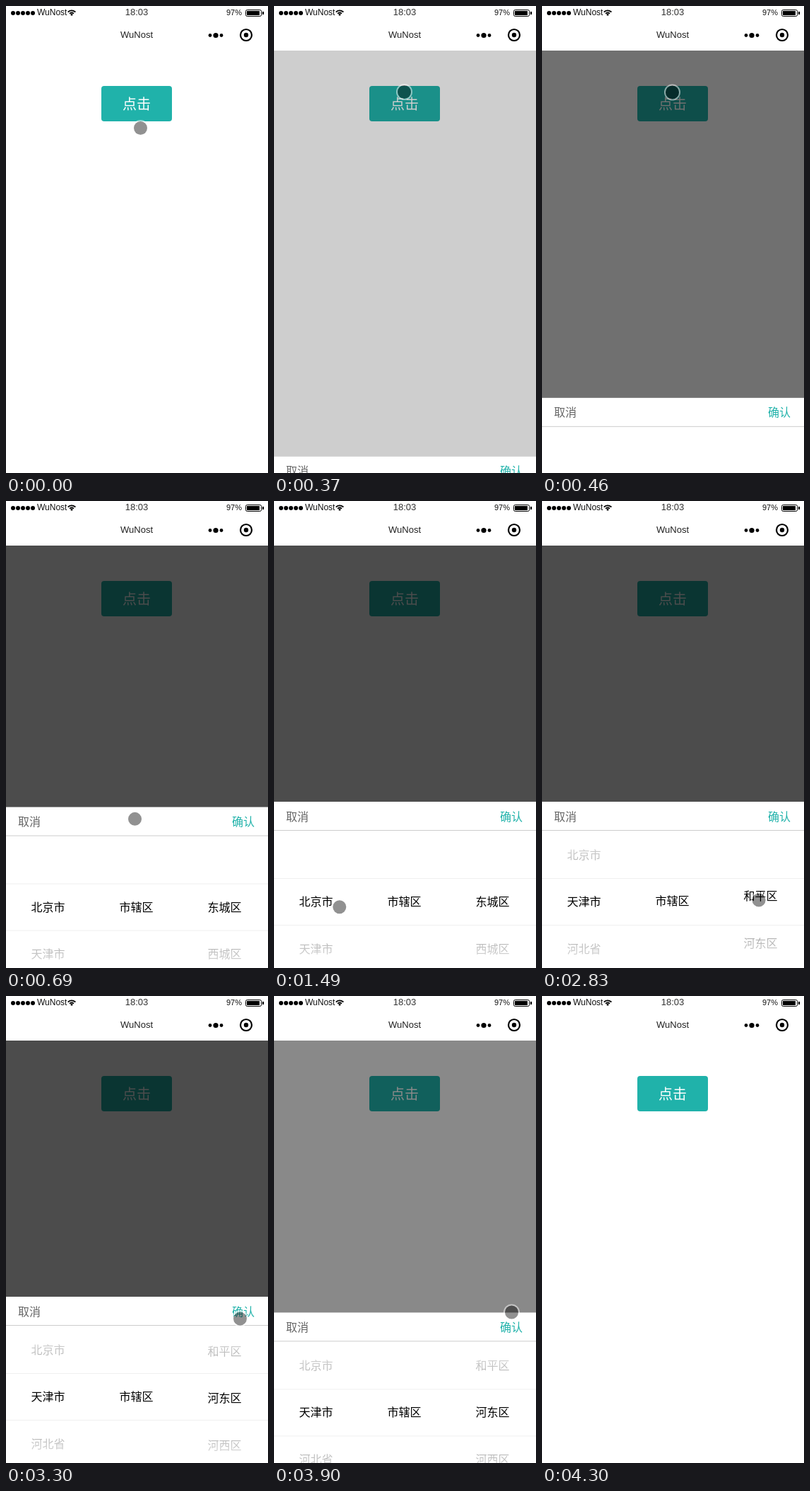
An HTML page with a canvas that plays this animation: 371 px wide and 660 px high, repeating every 4.39 s.

```html
<!DOCTYPE html>
<html lang="zh-CN">
<head>
<meta charset="utf-8">
<style>
html, body { margin: 0; width: 100%; height: 100%; overflow: hidden; background: #fff; }
canvas { display: block; }
</style>
</head>
<body>
<canvas id="stage" width="371" height="660"></canvas>
<script>
const W = 371, H = 660, NAV = 63;
const LOOP = 4390, STEPS = 56, STEP = LOOP / STEPS, LEAD = 25;
const OPEN = 344, CLOSE = 3876, CITY_SWITCH = 1880, POINTER_GONE = 4100;
const TEAL = '#20b2aa', APP = 'WuNost';
const LATIN = '"Liberation Sans", Arial, sans-serif';
const HAN = '"Noto Sans CJK SC", "Noto Sans CJK", sans-serif';
const SHEET = 235, HEADER = 41, ROW = 66.5, BAND_TOP = 108, BAND_BOTTOM = 174;
const ctx = document.getElementById('stage').getContext('2d');

const provinces = ['北京市', '天津市', '河北省', '山西省'];
const beijing = ['东城区', '西城区', '朝阳区'];
const tianjin = ['和平区', '河东区', '河西区', '南开区'];

// Places the pointer passes through: button, each wheel, confirm.
const pointerPath = [
  { t: 0, x: 190.5, y: 172.5 },
  { t: 157, x: 184.5, y: 121.5 },
  { t: 470, x: 184.5, y: 121.5 },
  { t: 706, x: 182.5, y: 450 },
  { t: 862, x: 172, y: 545 },
  { t: 1411, x: 93, y: 590 },
  { t: 1725, x: 92, y: 525 },
  { t: 1960, x: 202, y: 588 },
  { t: 2273, x: 206.5, y: 545.5 },
  { t: 2430, x: 207, y: 516 },
  { t: 2744, x: 303, y: 582 },
  { t: 3293, x: 331.5, y: 456 },
  { t: 3450, x: 333, y: 450.5 },
  { t: 3920, x: 336.5, y: 447 }
];

const progress = (t, start, duration) => Math.min(1, Math.max(0, (t - start) / duration));
const mix = (a, b, p) => a + (b - a) * p;
const smooth = p => p * p * (3 - 2 * p);

// cubic-bezier(.25, .1, .25, 1)
function ease(x) {
  const curve = (s, a, b) => 3 * s * (1 - s) ** 2 * a + 3 * s * s * (1 - s) * b + s ** 3;
  let lo = 0, hi = 1;
  for (let i = 0; i < 24; i++) {
    const mid = (lo + hi) / 2;
    if (curve(mid, .25, .25) < x) lo = mid; else hi = mid;
  }
  return curve(lo, .1, 1);
}

const openAndClose = (t, openTime, closeTime) =>
  ease(progress(t, OPEN, openTime)) - ease(progress(t, CLOSE, closeTime));

// One row up, overscroll and back, one row up.
const wheelOffsets = t => [
  -ROW * smooth(progress(t, 1490, 390)),
  -34 * Math.sin(Math.PI * progress(t, 2050, 820)) ** 2,
  -ROW * smooth(progress(t, 2670, 700))
];

function pointerAt(t) {
  const i = pointerPath.findIndex(stop => stop.t > t);
  if (i < 0) return pointerPath.at(-1);
  const a = pointerPath[i - 1], b = pointerPath[i];
  const p = progress(t, a.t, b.t - a.t);
  return { x: mix(a.x, b.x, p), y: mix(a.y, b.y, p) };
}

function rect(x, y, w, h, color) {
  ctx.fillStyle = color;
  ctx.fillRect(x, y, w, h);
}

function roundRect(x, y, w, h, r) {
  ctx.beginPath();
  ctx.roundRect(x, y, w, h, r);
}

function dot(x, y, r, color = '#000') {
  ctx.fillStyle = color;
  ctx.beginPath();
  ctx.arc(x, y, r, 0, 7);
  ctx.fill();
}

function arc(x, y, r, width, color = '#000', from = 0, to = 7) {
  ctx.strokeStyle = color;
  ctx.lineWidth = width;
  ctx.beginPath();
  ctx.arc(x, y, r, from, to);
  ctx.stroke();
}

function latin(text, x, baseline, size, color, align = 'left') {
  ctx.font = `${size}px ${LATIN}`;
  ctx.textAlign = align;
  ctx.fillStyle = color;
  ctx.fillText(text, x, baseline);
}

function han(text, x, middle, size, color) {
  ctx.font = `${size}px ${HAN}`;
  ctx.textAlign = 'center';
  ctx.fillStyle = color;
  ctx.fillText(text, x, middle + size * .38);
}

function drawBars() {
  for (let i = 0; i < 5; i++) dot(10 + i * 7, 10, 3);
  latin(APP, 44, 13, 12, '#111');
  for (const r of [3.8, 7]) arc(93, 13.3, r, 1.8, '#000', -Math.PI * .77, -Math.PI * .23);
  dot(93, 12.3, 1.4);
  latin('18:03', 185, 13, 13, '#333', 'center');
  latin('97%', 312, 13, 11, '#111');
  ctx.strokeStyle = '#000';
  ctx.lineWidth = 1;
  roundRect(339.5, 5.5, 22, 9, 2);
  ctx.stroke();
  rect(341, 7, 18, 6, '#000');
  rect(363, 8, 2, 4, '#000');

  latin(APP, 185, 45, 13, '#222', 'center');
  dot(289, 41.5, 2.4);
  dot(297, 41.5, 3.6);
  dot(305, 41.5, 2.4);
  arc(340, 41, 8, 2.2);
  dot(340, 41, 3.2);
}

function drawButton() {
  ctx.fillStyle = TEAL;
  roundRect(135, 113, 100, 50, 4);
  ctx.fill();
  han('点击', 185, 138, 20, '#fff');
}

function fade(top, height, from, to) {
  const g = ctx.createLinearGradient(0, top, 0, top + height);
  g.addColorStop(0, `rgba(255,255,255,${from})`);
  g.addColorStop(1, `rgba(255,255,255,${to})`);
  rect(0, top, W, height, g);
}

function drawWheels(t) {
  const columns = [provinces, ['市辖区'], t < CITY_SWITCH ? beijing : tianjin];
  const offsets = wheelOffsets(t);
  ctx.save();
  ctx.beginPath();
  ctx.rect(0, HEADER, W, 201);
  ctx.clip();
  columns.forEach((names, c) => names.forEach((name, i) =>
    han(name, 59.5 + 125 * c, 141 + i * ROW + offsets[c], 16, '#000')));
  fade(HEADER, BAND_TOP - HEADER, .95, .6);
  fade(BAND_BOTTOM + 1, 67, .6, .95);
  for (const y of [BAND_TOP, BAND_BOTTOM]) rect(0, y, W, 1, '#f0f0f0');
  ctx.restore();
}

function drawSheet(t, top) {
  ctx.save();
  ctx.translate(0, top);
  rect(0, 0, W, H, '#fff');
  drawWheels(t);
  han('取消', 33, 20.5, 16, '#666');
  han('确认', 336, 20.5, 16, TEAL);
  rect(0, HEADER - 1, W, 1, '#ccc');
  ctx.restore();
}

function drawPointer({ x, y }) {
  arc(x, y, 10.5, 2, 'rgba(255,255,255,.5)');
  dot(x, y, 9.5, 'rgba(0,0,0,.43)');
}

function draw(t) {
  rect(0, 0, W, H, '#fff');
  drawBars();
  drawButton();
  const shade = .7 * openAndClose(t, 252, 200);
  rect(0, NAV, W, H - NAV, `rgba(0,0,0,${shade.toFixed(4)})`);
  const slide = openAndClose(t, 468, 435);
  if (slide > 0) drawSheet(t, H - SHEET * slide);
  if (t < POINTER_GONE) drawPointer(pointerAt(t));
}

// The picture is held for one step at a time.
function frame() {
  const now = performance.now() % LOOP;
  const step = Math.min(STEPS - 1, Math.floor((now + LEAD) / STEP));
  draw(step * STEP);
  requestAnimationFrame(frame);
}
frame();
</script>
</body>
</html>
```
